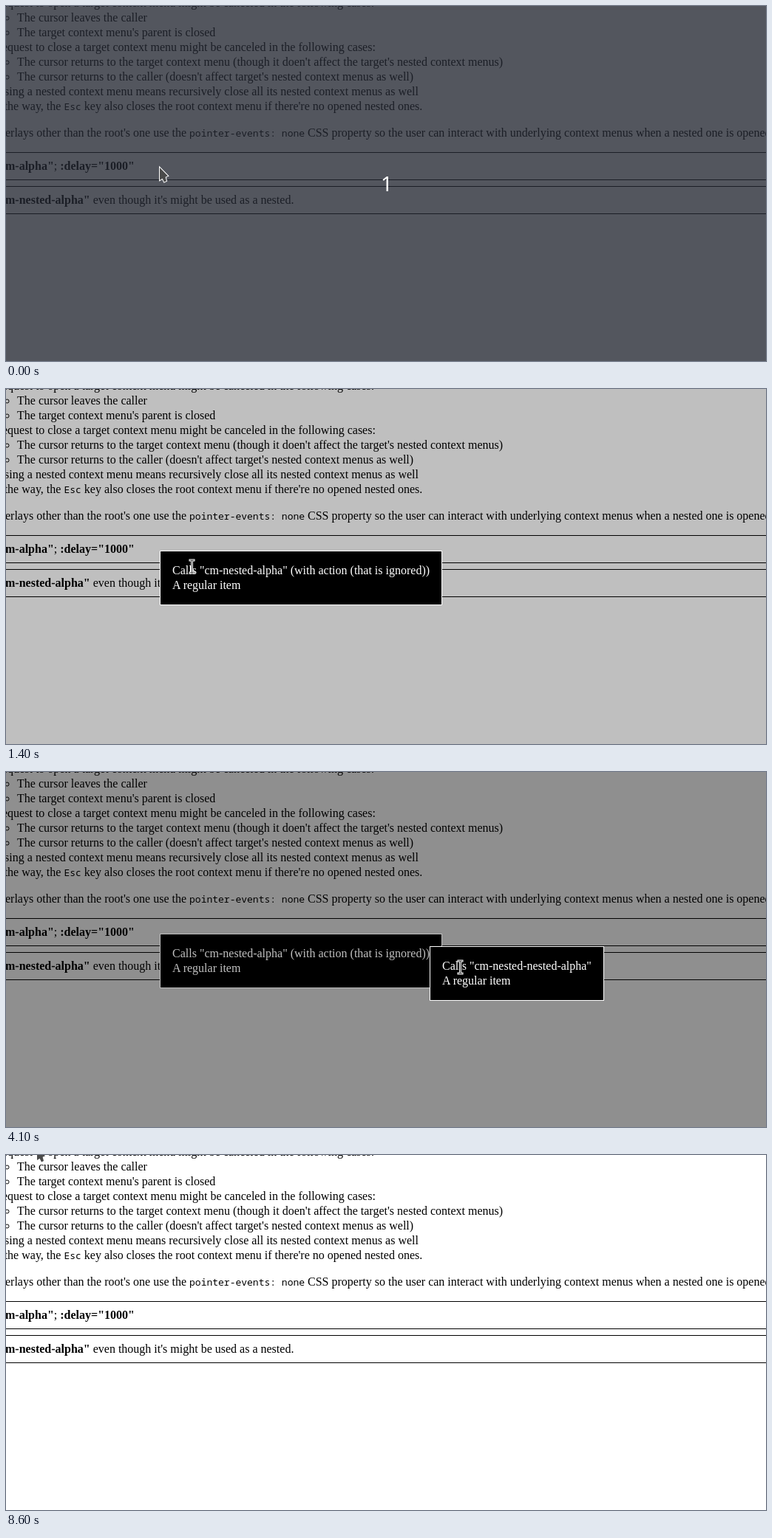
An HTML page that plays this animation: 1028 px wide and 481 px high, repeating every 9000 ms.

```html
<!DOCTYPE html>
<html lang="en">
<head>
<meta charset="utf-8">
<title>Nested context menus</title>
<style>
  html, body { margin: 0; width: 100%; height: 100%; overflow: hidden; background: #fff; }
  #stage {
    position: relative; width: 1028px; height: 481px; overflow: hidden; background: #fff;
    font: 16px/20px "Liberation Serif", "Times New Roman", serif; color: #000; white-space: nowrap;
  }
  #page { position: absolute; left: -65px; top: -14px; width: 1300px; }
  #page ul, #page p { margin: 0; }
  #page ul { padding-left: 40px; list-style: disc; }
  #page ul ul { list-style: circle; }
  #page p { margin: 16px 0; }
  code { font: 13px/0 "Noto Sans Mono", monospace; }
  .caller { position: relative; height: 36px; margin-bottom: 8px; border: 1px solid #000; }
  .caller span { position: absolute; left: 63px; top: 8px; }
  .shade { position: absolute; inset: 0; background: rgba(0, 0, 0, .25); visibility: hidden; }
  .menu { position: absolute; padding: 16px; border: 1px solid #fff; background: #000; color: #fff; }
  #count {
    position: absolute; inset: 0; background: rgba(35, 39, 49, .78); color: #fff;
    font: 28px/481px "Noto Sans", sans-serif; text-align: center; text-indent: 2px;
  }
  #cursor { position: absolute; left: 0; top: 0; overflow: visible; }
</style>
</head>
<body>
<div id="stage">
  <div id="page">
    <ul>
      <li>A request to open a target context menu might be canceled in the following cases:
        <ul>
          <li>The cursor leaves the caller</li>
          <li>The target context menu's parent is closed</li>
        </ul>
      </li>
      <li>A request to close a target context menu might be canceled in the following cases:
        <ul>
          <li>The cursor returns to the target context menu (though it doen't affect the target's nested context menus)</li>
          <li>The cursor returns to the caller (doesn't affect target's nested context menus as well)</li>
        </ul>
      </li>
      <li>Closing a nested context menu means recursively close all its nested context menus as well</li>
      <li>By the way, the <code>Esc</code> key also closes the root context menu if there're no opened nested ones.</li>
    </ul>
    <p>All the overlays other than the root's one use the <code>pointer-events: none</code> CSS property so the user can interact with underlying context menus when a nested one is opened.</p>
    <div class="caller"><span><b>m-alpha"</b>; <b>:delay="1000"</b></span></div>
    <div class="caller"><span><b>m-nested-alpha"</b> even though it's might be used as a nested.</span></div>
  </div>

  <div class="shade"><div class="menu" style="left:208px;top:219px">Calls "cm-nested-alpha" (with action (that is ignored))<br>A regular item</div></div>
  <div class="shade"><div class="menu" style="left:573px;top:236px">Calls "cm-nested-nested-alpha"<br>A regular item</div></div>
  <div class="shade"><div class="menu" style="left:792px;top:253px">A regular item</div></div>

  <div id="count">1</div>

  <svg id="cursor" width="1" height="1">
    <path id="arrow" d="M0 0V17L3.6 14.8L6 19.5L9 18L7.6 12.7L11 11.2Z"
      fill="#4a4a4a" stroke="#fff" stroke-width="2" paint-order="stroke"/>
    <g id="beam" fill="none">
      <path d="M-4-8.5H4M0-8.5V8.5M-4 8.5H4" stroke="#fff" stroke-width="3"/>
      <path d="M-3-8.5H3M0-8.5V8.5M-3 8.5H3" stroke="#333" stroke-width="1"/>
    </g>
  </svg>
</div>

<script>
  const LOOP = 9000, STEP = 100;
  const COUNT_END = 400, CLOSE = 8000, OPEN = [700, 2300, 6000];

  const $ = id => document.getElementById(id);
  const shades = document.querySelectorAll('.shade');
  const smooth = p => p * p * (3 - 2 * p);

  // Pointer stops: time, x, y, shape
  const stops = [
    [0, 208, 219, 'arrow'],
    [1100, 216, 222, 'arrow'], [1200, 231, 228, 'arrow'],
    [1300, 245, 233, 'arrow'], [1400, 251.5, 240.5, 'beam']
  ];
  for (let i = 1; i <= 10; i++) {
    const p = i / 10;
    stops.push([2700 + i * STEP, 251.5 + Math.round(317 * smooth(p)),
      240.5 + Math.round(3 * Math.sin(p * Math.PI)), 'beam']);
  }
  stops.push(
    [3800, 579, 244, 'arrow'], [3900, 597, 249, 'arrow'],
    [4000, 610, 252, 'arrow'], [4100, 614.5, 264.5, 'beam'],
    [7200, 606, 232, 'arrow'], [7300, 584, 184, 'arrow'], [7400, 567, 158, 'arrow']
  );
  for (let i = 1; i <= 7; i++) {
    const p = smooth(i / 7);
    stops.push([7900 + i * STEP, Math.round(567 - 525 * p), Math.round(158 - 168 * p), 'arrow']);
  }

  const show = (el, on) => { el.style.visibility = on ? 'visible' : 'hidden'; };

  function draw(t) {
    show($('count'), t < COUNT_END);
    shades.forEach((el, i) => show(el, t >= OPEN[i] && t < CLOSE));
    const [, x, y, shape] = stops.filter(s => s[0] <= t).pop();
    $('cursor').style.transform = `translate(${x}px, ${y}px)`;
    show($('arrow'), shape === 'arrow');
    show($('beam'), shape === 'beam');
  }

  const start = performance.now();
  function tick() {
    draw((performance.now() - start) % LOOP);
    requestAnimationFrame(tick);
  }
  tick();
</script>
</body>
</html>
```
